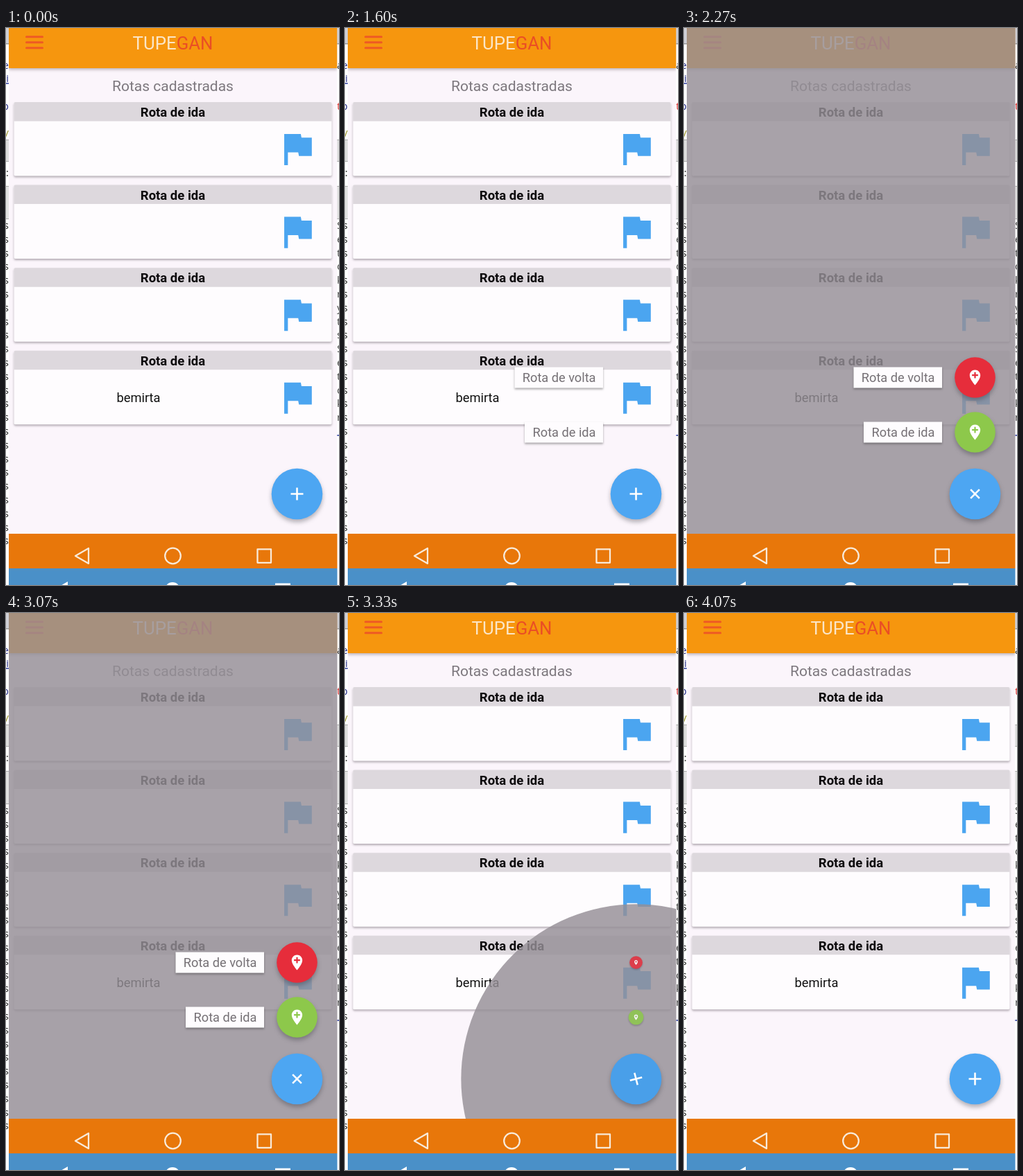
Recreate the animation shown at these times as an HTML page. Size 480x804 px, loop 4140 ms.

```html
<!DOCTYPE html>
<html lang="pt">
<head>
<meta charset="utf-8">
<title>Rotas cadastradas</title>
<style>
html, body { margin: 0; width: 100%; height: 100%; overflow: hidden; background: #fff; }
svg { display: block; width: 100vw; height: 100vh; }
text { font-family: Roboto, sans-serif; }
.code text { font: 15px "Open Sans", sans-serif; }
.mid { text-anchor: middle; }
.card { filter: drop-shadow(0 2px 1.5px rgba(60, 50, 60, .38)); }
.fab { filter: drop-shadow(0 4px 3px rgba(40, 40, 50, .34)); }
.tag { filter: drop-shadow(0 2px 1.5px rgba(40, 40, 40, .4)); }
.bar { filter: drop-shadow(0 2px 2px rgba(60, 50, 60, .35)); }
</style>
</head>
<body>
<svg viewBox="0 0 480 804" xmlns="http://www.w3.org/2000/svg">
  <defs>
    <clipPath id="screen"><rect x="4" width="473.5" height="730"/></clipPath>
    <clipPath id="bottom"><rect x="4" y="780" width="473.5" height="24"/></clipPath>
    <path id="flag" d="M14.4 6L14 4H5v17h2v-7h5.6l.4 2h7V6z" fill="#4ba5f0"/>
    <path id="pin" transform="scale(1.1) translate(-12 -12)" fill="#fff"
      d="M12 2C8.14 2 5 5.14 5 9c0 5.25 7 13 7 13s7-7.75 7-13c0-3.86-3.14-7-7-7zm4 8h-3v3h-2v-3H8V8h3V5h2v3h3v2z"/>
  </defs>

  <rect width="480" height="804" fill="#fff"/>
  <g id="code" class="code"></g>

  <g clip-path="url(#screen)">
    <rect x="4" width="473.5" height="730" fill="#fbf5fb"/>
    <rect class="bar" x="4" y="-10" width="473.5" height="68" fill="#f6960e"/>
    <path d="M29.5 12.7H52.5M29.5 20.7H52.5M29.5 28.7H52.5" stroke="#ee5a24" stroke-width="3" stroke-linecap="round"/>
    <text class="mid" x="240.5" y="31" font-size="25.8" fill="#fbe6c8">TUPE<tspan fill="#ea4e25">GAN</tspan></text>
    <text class="mid" x="240.5" y="90.5" font-size="21" fill="#7d787e">Rotas cadastradas</text>
    <g id="cards"></g>
    <text class="mid" x="191" y="540" font-size="18.3" fill="#111">bemirta</text>
    <circle id="veil" cx="419.5" cy="672.5" r="0" fill="rgb(149,143,150)" fill-opacity=".82"/>
    <g id="tags"></g>
    <g id="minis"></g>
    <g transform="translate(419.5 672.5)">
      <circle id="fab" class="fab" r="36.8" fill="#4da6f2"/>
      <path id="plus" d="M-9 0H9M0 -9V9" stroke="#fff" stroke-width="2.6"/>
    </g>
  </g>

  <rect x="4" y="730" width="473.5" height="50" fill="#e8770a"/>
  <rect x="4" y="780" width="473.5" height="24" fill="#4a90c8"/>
  <g fill="none" stroke="#f8ead9" stroke-width="2.3" stroke-linejoin="round">
    <path d="M100 762L119 751V773Z"/>
    <circle cx="240.5" cy="762" r="11.3"/>
    <rect x="362.5" y="752.3" width="19.5" height="19.5"/>
  </g>
  <g clip-path="url(#bottom)" fill="#fff">
    <path d="M77 806L89 799V806Z"/>
    <circle cx="240" cy="811" r="11"/>
    <rect x="388" y="801.5" width="22" height="8"/>
  </g>
</svg>
<script>
const $ = id => document.getElementById(id);
const LOOP = 4140, STEP = 200 / 3;
const OPEN = 1582, CLOSE = 3148, SPAN = 300, REACH = 790;

// Accelerate, then decelerate, over SPAN ms.
const ease = (t, start) => {
  const p = Math.min(1, Math.max(0, (t - start) / SPAN));
  return (1 - Math.cos(Math.PI * p)) / 2;
};
const shown = (t, inAt, outAt) => ease(t, inAt) - ease(t, outAt);

// Strips of the editor window visible beside the phone.
function drawCode() {
  const box = (y, h, fill) => `<rect y="${y}" width="480" height="${h}" fill="${fill}"/>`;
  const left = (s, y, fill) => `<text x="4" y="${y}" text-anchor="end" fill="${fill}">${s}</text>`;
  const right = (s, y, fill) => `<text x="477" y="${y}" fill="${fill}">${s}</text>`;
  let s = box(0, 22, '#cfd0d6') + box(22, 1.5, '#999') + box(161, 31, '#dedede') + box(228, 47, '#e2e2e2');
  for (const y of [161, 192, 228, 275]) s += box(y, 1, '#aaa');
  s += left('e', 59, '#222a88') + left('i', 78, '#222a88') + left('b', 118, '#222a88');
  s += left('/', 158, '#999322') + left(':', 214, '#222');
  s += right('a', 59, '#333') + right('t', 118, '#d33');
  const tail = 'Setckryts';
  for (let i = 0; i < 24; i++) {
    const y = 290 + i * 19.8;
    s += left('s', y, '#222');
    if (i < 15) s += right(tail[i % tail.length], y, '#444');
  }
  s += '<path d="M0 80H4M477 588H480" stroke="#2a3aa0" stroke-width="1.3"/>';
  $('code').innerHTML = s;
}

function drawCards() {
  let s = '';
  for (let i = 0; i < 4; i++) {
    s += `<g transform="translate(0 ${i * 119.6})">
      <rect class="card" x="11.5" y="107" width="458" height="106.5" rx="2" fill="#fefcfe"/>
      <path d="M11.5 134.5V109q0-2 2-2H467.5q2 0 2 2V134.5Z" fill="#ddd8dd"/>
      <text class="mid" x="240.5" y="128" font-size="18.5" font-weight="700" fill="#0c0a0c">Rota de ida</text>
      <use href="#flag" transform="translate(387.8 142.4) scale(2.65)"/></g>`;
  }
  $('cards').innerHTML = s;
}

const actions = [
  { text: 'Rota de volta', x: 244.5, y: 504.5, fill: '#e62d3b', inAt: 1575, outAt: 3148 },
  { text: 'Rota de ida', x: 259, y: 583.5, fill: '#8dc84b', inAt: 1592, outAt: 3158 }
];

function drawActions() {
  $('tags').innerHTML = actions.map(a =>
    `<rect class="tag" x="${a.x}" y="${a.y - 15}" width="${372 - a.x}" height="30" fill="#fefcfe"/>
     <text x="361.5" y="${a.y + 6.5}" text-anchor="end" font-size="18.2" fill="#757075">${a.text}</text>`).join('');
  $('minis').innerHTML = actions.map(a =>
    `<g><circle class="fab" r="29.3" fill="${a.fill}"/><use href="#pin"/></g>`).join('');
}

function render(ms) {
  const t = Math.floor((ms % LOOP + 4) / STEP) * STEP;
  const k = shown(t, OPEN, CLOSE);
  const moving = k > 0.02 && k < 0.999;
  $('veil').setAttribute('r', REACH * k);
  $('plus').setAttribute('transform', `rotate(${-45 * k})`);
  $('fab').setAttribute('fill', moving ? '#499fe9' : '#4da6f2');
  $('tags').setAttribute('visibility', t >= OPEN && t < CLOSE ? 'visible' : 'hidden');
  actions.forEach((a, i) => {
    const s = shown(t, a.inAt, a.outAt), g = $('minis').children[i];
    g.setAttribute('visibility', s > 0.03 ? 'visible' : 'hidden');
    g.setAttribute('transform', `translate(419.5 ${a.y}) scale(${s})`);
    g.setAttribute('opacity', moving ? 0.85 : 1);
  });
}

drawCode();
drawCards();
drawActions();
const begin = performance.now();
function tick() {
  render(performance.now() - begin);
  requestAnimationFrame(tick);
}
tick();
</script>
</body>
</html>
```
